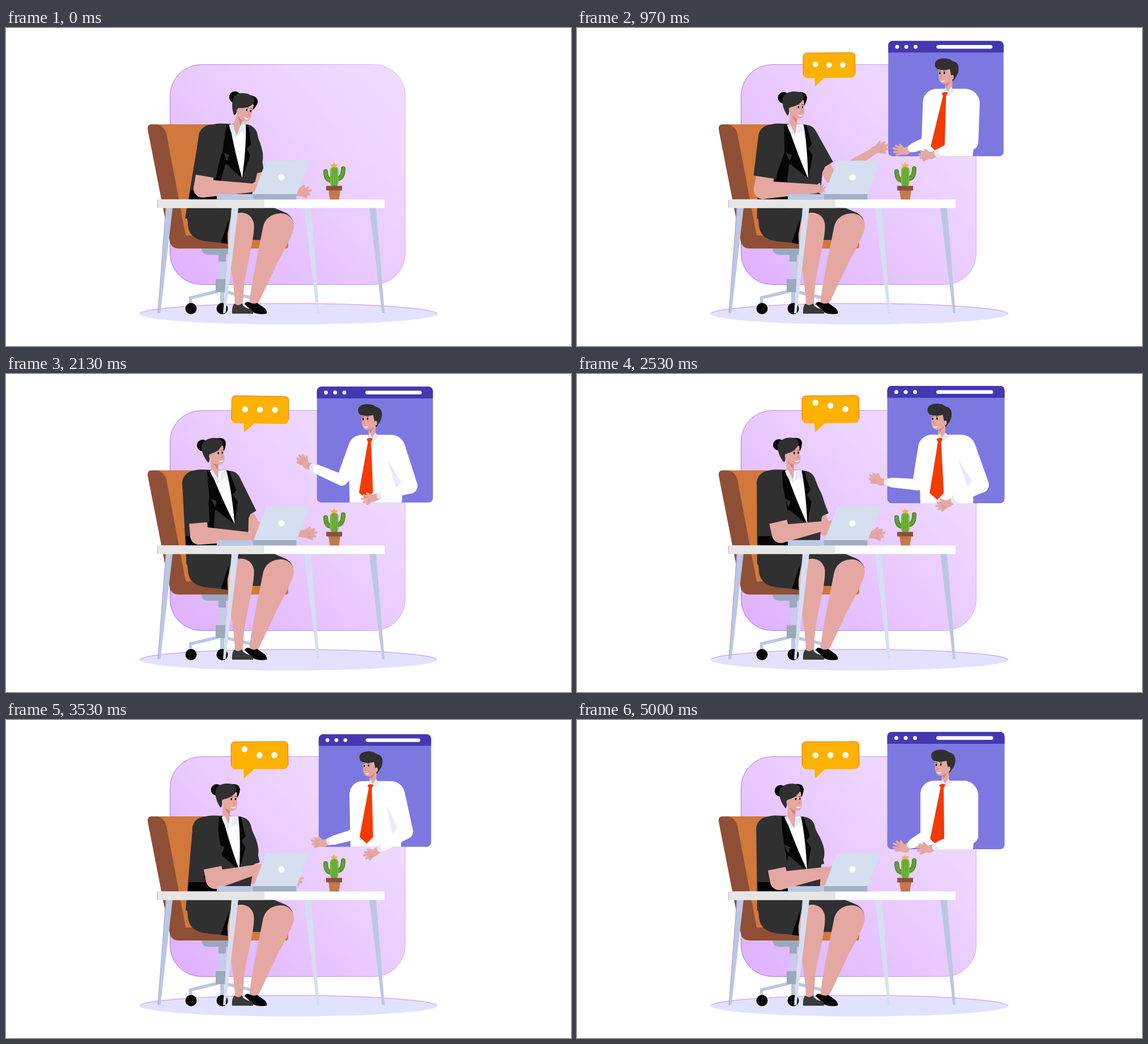
Recreate the animation shown at these times as an HTML page with a canvas. Size 997x561 px, loop 5.11 s.

```html
<!DOCTYPE html>
<html lang="en">
<head>
<meta charset="utf-8">
<title>Video meeting</title>
<style>
html, body { margin: 0; width: 100%; height: 100%; overflow: hidden; background: #fff; }
canvas { display: block; }
</style>
</head>
<body>
<canvas id="stage" width="997" height="561"></canvas>
<script>
const ctx = document.getElementById('stage').getContext('2d');
const LOOP = 5110;
const SKIN = '#e5a7a2', SEAM = '#c9857f', DARK = '#303030', BLACK = '#050505';
const WHITE = '#fff', PALE = '#e6eaf6', STEEL = '#bbc7e2', MIST = '#d5dfef';

// Pose tracks: one value per key time
const KEYS = [100, 570, 1430, 2130, 2930, 4170, 5000];
const woman = {
  lean: [.18, .10, -.026, -.04, .065, .11, 0],
  bunX: [404, 380, 353, 347, 367, 374, 359],
  bunY: [122, 122, 125, 126, 124, 123, 125],
  tilt: [19, 9, .5, -2, 2, 5, 0],
  elbowX: [347, 332, 326, 341, 373, 362, 357],
  elbowY: [283, 284, 287, 285, 280, 284, 284],
  handX: [431, 424, 418, 428, 452, 446, 452],
  handY: [282, 281, 287, 287, 247, 278, 266],
  farElbowX: [444, 449, 449, 438, 438, 438, 427],
  farElbowY: [280, 268, 262, 270, 277, 280, 282],
  farHandX: [516, 523, 530, 526, 513, 492, 488],
  farHandY: [290, 223, 211, 282, 284, 280, 275],
  farTurn: [0, -16, -8, 2, -2, 0, 0]
};
const man = {
  shift: [10, 9, -1, -3, -6, 2.5, 0],
  elbowX: [620, 620, 615, 592, 612, 617, 616],
  elbowY: [203, 203, 200, 188, 203, 205, 204],
  handX: [584, 584, 559, 528, 544, 565, 577],
  handY: [223, 223, 208, 160, 220, 223, 227],
  turn: [183, 183, 196, 225, 185, 190, 198],
  farElbowX: [696, 696, 694, 713, 712, 700, 694],
  farElbowY: [203, 203, 202, 198, 194, 206, 204],
  farHandX: [622, 622, 627, 648, 657, 637, 620],
  farHandY: [227, 227, 225, 220, 238, 239, 228],
  farTurn: [180, 180, 170, 168, 152, 165, 182]
};

const clamp = (v, a, b) => Math.min(b, Math.max(a, v));

// Smooth curve through the keys without overshoot
function sample(track, t) {
  const slope = i => (track[i + 1] - track[i]) / (KEYS[i + 1] - KEYS[i]);
  const tangent = i => {
    if (i === 0) return slope(0);
    if (i === KEYS.length - 1) return slope(i - 1);
    const a = slope(i - 1), b = slope(i);
    return a * b <= 0 ? 0 : 2 * a * b / (a + b);
  };
  t = clamp(t, KEYS[0], KEYS[KEYS.length - 1]);
  let i = 0;
  while (i < KEYS.length - 2 && t > KEYS[i + 1]) i++;
  const h = KEYS[i + 1] - KEYS[i], u = (t - KEYS[i]) / h, v = 1 - u;
  return track[i] * v * v * (1 + 2 * u) + track[i + 1] * u * u * (3 - 2 * u)
    + h * u * v * (tangent(i) * v - tangent(i + 1) * u);
}

function poseAt(tracks, t) {
  const pose = {};
  for (const name in tracks) pose[name] = sample(tracks[name], t);
  return pose;
}

function shape(d, fill) { ctx.fillStyle = fill; ctx.fill(new Path2D(d)); }

function line(d, color, width = 1) {
  ctx.strokeStyle = color;
  ctx.lineWidth = width;
  ctx.stroke(new Path2D(d));
}

function oval(x, y, rx, ry, fill) {
  ctx.beginPath();
  ctx.ellipse(x, y, rx, ry, 0, 0, 7);
  ctx.fillStyle = fill;
  ctx.fill();
}

function dot(x, y, r, fill) { oval(x, y, r, r, fill); }

function box(x, y, w, h, r, fill) {
  ctx.beginPath();
  ctx.roundRect(x, y, w, h, r);
  ctx.fillStyle = fill;
  ctx.fill();
}

function group(draw) { ctx.save(); draw(); ctx.restore(); }

const mix = (a, b, u) => [a[0] + (b[0] - a[0]) * u, a[1] + (b[1] - a[1]) * u];

// Tapered capsule
function limb(a, b, ra, rb, fill) {
  const dx = b[0] - a[0], dy = b[1] - a[1];
  const dir = Math.atan2(dy, dx);
  const off = Math.acos(clamp((ra - rb) / Math.hypot(dx, dy), -1, 1));
  ctx.beginPath();
  ctx.arc(...a, ra, dir + off, dir - off + 2 * Math.PI);
  ctx.arc(...b, rb, dir - off, dir + off);
  ctx.fillStyle = fill;
  ctx.fill();
}

// Round shoulder, flat cuff
function sleeve(a, b, r, half, fill) {
  const dir = Math.atan2(b[1] - a[1], b[0] - a[0]);
  const nx = -Math.sin(dir) * half, ny = Math.cos(dir) * half;
  ctx.beginPath();
  ctx.arc(...a, r, dir + Math.PI / 2, dir + Math.PI * 1.5);
  ctx.lineTo(b[0] - nx, b[1] - ny);
  ctx.lineTo(b[0] + nx, b[1] + ny);
  ctx.fillStyle = fill;
  ctx.fill();
}

function hand(x, y, deg, flip = 1, size = 1) {
  group(() => {
    ctx.translate(x, y);
    ctx.rotate(deg * Math.PI / 180);
    ctx.scale(size, size * flip);
    ctx.lineCap = 'round';
    oval(0, 0, 10, 6.5, SKIN);
    line('M1 -4L9 -10.500M4 -4L16 -8M5 -1L20 -3M5 2L18 3.500M3 4L13 8', SKIN, 4);
    line('M9 -3L16 -5.500M8 .5L18 .3M7 4L15 5.700', SEAM, .6);
  });
}

function drawRoom() {
  const g = ctx.createLinearGradient(300, 440, 690, 80);
  g.addColorStop(0, '#dfb2ff');
  g.addColorStop(.75, '#eed6ff');
  g.addColorStop(1, '#f0dbff');
  box(289.5, 64.5, 415, 388, 55, g);
  const edge = ctx.createLinearGradient(289, 300, 705, 200);
  edge.addColorStop(0, '#a274de');
  edge.addColorStop(1, '#dcb6f6');
  ctx.strokeStyle = edge;
  ctx.lineWidth = 1;
  ctx.stroke();

  oval(498.5, 504.5, 262, 18.5, '#e2e2ff');
  line('M236.5 504.5A262 18.5 0 0 1 760.5 504.5', '#d9a9ee', 1.5);

  shape('M250 179Q249 170 257 170H345L400 373H498V385Q498 389 493 389H305Q292 389 289 377L278 322Z', '#8f4f36');
  shape('M267 170H370L430 366H317L283 186Q280 174 267 170Z', '#d1783c');
  shape('M392 366H498V385Q498 389 493 389H392Z', '#d1783c');
  shape('M345 389H392V400H356Q346 400 345 389Z', '#9aa9bd');
  line('M325.500 486V476L374 464.500M433 486V476L384 464.500', STEEL, 5.5);
  box(377, 412, 10, 34, 0, '#c3cfe6');
  box(375, 400, 13, 12, 0, '#9aa9bd');
  box(370, 443, 17, 23, 0, '#9aa9bd');
  box(378, 466, 7, 20, 0, STEEL);
  dot(326.5, 495, 10, BLACK);
  dot(381.5, 495, 10, BLACK);
}

function drawLegs() {
  shape('M319 316L318 333Q321 338 321 348C323 368 338 375 358 377L392 380V373L452 374Q460 332 480 328Q502 328 507 347Q508 335 494 326L470 316Z', DARK);
  shape('M379 379L393 338V381Z', BLACK);
  shape('M396 338C400 321 434 320 437.500 346C439 372 424 420 420 455L417.500 489H404C403 440 390 400 391 362Z', SKIN);
  shape('M453 354C456 335 470 327 486 327C500 328 508 338 508 349C507 364 492 390 478 416L448 480L443 488H429C433 450 444 400 453 354Z', SKIN);
  shape('M421 487Q424 481 430 484Q437 488 443 485L456 494Q461 498 460 504Q446 506 437 502Z', BLACK);
  shape('M399 504Q398 491 403 486Q410 492 416 486Q420 494 432 496Q437 499 436 504Z', '#3a3a3a');
}

function drawDesk() {
  shape('M282 317H294L272.500 503H268Z', STEEL);
  shape('M398 317H410L387.500 503H383Z', MIST);
  shape('M526 317H538L553 503H548.500Z', MIST);
  shape('M641 317H653L668 503H663.500Z', STEEL);
  line('M282 318L268 503', '#a68ad8', .8);
  box(267, 302.5, 401, 15, 0, WHITE);
  box(267, 302.5, 189, 15, 0, '#e6e6e6');
  line('M267.500 303V317', '#d49be8');

  box(372, 293, 65, 9.5, 0, '#b9c8e4');
  box(436, 293, 76.5, 9.5, 0, '#a3b0c4');
  shape('M463 234H533Q536 234 535 237L513 293H437L458 237Q459 234 463 234Z', MIST);
  dot(486, 263.5, 5.6, WHITE);

  group(() => {
    ctx.lineCap = 'round';
    line('M575 269Q564 269 564 253M584 266Q595 266 595 248', '#4c8527', 8);
    line('M575 269Q564 269 564 253M584 266Q595 266 595 248', '#62a033', 5);
    box(572, 244, 14.5, 36, 7, '#74b83a');
    line('M576 248V278M579.200 246V278M582.500 248V278', '#4f9130', .9);
    shape('M579 237L581 241L586 240L583 244L584 247L579 245L574 247L575 244L572 240L577 241Z', '#eeb04c');
  });
  shape('M569 286H590L587.500 302.500H571.500Z', '#c4794a');
  box(565, 278.5, 28, 8, 0, '#8b4f3c');
}

function drawWomanHead(p) {
  group(() => {
    ctx.translate(p.bunX, p.bunY);
    ctx.rotate(p.tilt * Math.PI / 180);
    ctx.translate(-359, -125);
    shape('M372 146L386 158L385 178L383 192L372 172Z', SKIN);
    shape('M374 154L385 160L384 168Z', SEAM);
    dot(359, 125, 10.2, BLACK);
    shape('M384 113Q398 111 400 121Q400 130 395 138L385 132Z', BLACK);
    shape('M372 139L370 148L375 155Q382 161 390 160Q396 158 397 149L395 127L384 124Z', SKIN);
    shape('M357 127C358 116 374 109 389 114Q397 119 392 128Q386 137 374 140L371 142L370 153L368 156C361 147 357 138 357 127Z', DARK);
    oval(372, 145, 2.4, 4, SKIN);
    oval(386, 139.5, 1.3, 2.1, BLACK);
    oval(393.2, 139, 1.2, 2.1, BLACK);
    line('M383 135Q386 133 388 135M391.500 134.500L395 134.500', DARK, .9);
    line('M391 143L393.500 147.500L390.500 148', SEAM, .8);
    shape('M385.500 153Q391 154 395 152Q392 159 385.500 153Z', WHITE);
  });
}

function drawWoman(t) {
  const p = poseAt(woman, t);
  const leaned = (x, y) => [x + p.lean * (325 - y), y];
  const body = draw => group(() => {
    ctx.transform(1, 0, -p.lean, 1, p.lean * 325, 0);
    draw();
  });
  const shoulder = leaned(338.5, 193), elbow = [p.elbowX, p.elbowY];
  const farShoulder = leaned(400, 191), farElbow = [p.farElbowX, p.farElbowY];
  const farHand = [p.farHandX, p.farHandY];
  const wrist = [p.handX, p.handY];

  limb(farShoulder, farElbow, 12, 11, SKIN);
  limb(farElbow, farHand, 11, 6, SKIN);
  hand(...farHand, p.farTurn, 1, 1.08);
  drawLegs();

  body(() => {
    shape('M318 336L316.500 205C316 183 326 169 350 168.500L396 170C409 171 415 181 422 195C436 219 442 236 431 254L428 303L380 338Z', DARK);
    shape('M319 286H372V318H319Z', BLACK);
    shape('M364 216L374 238L370 278H344Z', BLACK);
  });
  sleeve(farShoulder, mix(farShoulder, farElbow, .74), 20, 17, DARK);
  body(() => {
    shape('M361 171H370L406 266L372 238L376 224L363 219Z', BLACK);
    shape('M392 170L400 171L411 205L405 213L413 225L406 266L398 200Z', BLACK);
    shape('M372 240L404 264L424 271H369Z', DARK);
    shape('M367 170H395Q403 205 406 265Q387 225 367 170Z', WHITE);
  });
  drawWomanHead(p);
  body(() => {
    shape('M366 171L371 169L383 191L376 189Q370 183 366 171Z', PALE);
    shape('M386 172L394 171L397 190L391 182L383 191Z', PALE);
  });

  const cuff = mix(shoulder, elbow, .76);
  limb(cuff, elbow, 16, 16, SKIN);
  limb(elbow, wrist, 16, 8, SKIN);
  hand(...wrist, 2, 1, .85);
  sleeve(shoulder, cuff, 22.5, 20, DARK);
}

function drawManHead() {
  shape('M645 90L657 86L656 106L649 114L643 108Z', SKIN);
  shape('M645 97L654 93L646 104Z', SEAM);
  shape('M631 70L632 88Q634 99 642 98Q651 97 657 89V70Z', SKIN);
  shape('M625 63C625 53 640 50 652 54Q656 57 659 58C669 60 670 74 664 84L657 94L654 82L652 72Q640 75 630 72Q625 69 625 63Z', DARK);
  oval(656.5, 86, 2.4, 4, SKIN);
  oval(634, 79, 1.3, 2.3, BLACK);
  oval(642, 78.5, 1.3, 2.3, BLACK);
  line('M631.500 75L635.500 74.500M639.500 74.500L644 74.500', DARK, .9);
  line('M637 82L635 87L638 87.500', SEAM, .8);
  shape('M634.500 92Q639 94 643.500 91.500Q640 97.500 634.500 92Z', WHITE);
}

function manArm(shoulder, elbow, palm, deg, shoulderR, elbowR) {
  const wrist = mix(palm, elbow, 14 / Math.hypot(elbow[0] - palm[0], elbow[1] - palm[1]));
  const cuff = mix(wrist, elbow, .16);
  limb(palm, wrist, 6, 6, SKIN);
  hand(...palm, deg, -1);
  limb(wrist, cuff, 7, 8, PALE);
  limb(shoulder, elbow, shoulderR, elbowR, WHITE);
  limb(elbow, cuff, elbowR, 8.5, WHITE);
}

function drawMan(t) {
  const p = poseAt(man, t), k = p.shift / 115;
  const leaned = (x, y) => [x + k * (228 - y), y];
  const body = draw => group(() => {
    ctx.transform(1, 0, -k, 1, k * 228, 0);
    draw();
  });
  const farElbow = [p.farElbowX, p.farElbowY];

  body(() => shape('M606 228V132C607 114 620 107 640 107H672C696 107 706 116 706 136L699 228Z', WHITE));
  manArm(leaned(630, 131), [p.elbowX, p.elbowY], [p.handX, p.handY], p.turn, 24, 10);
  group(() => {
    ctx.translate(p.shift * 1.35, 0);
    drawManHead();
  });
  body(() => {
    shape('M641 109L646 105L650 114L643 117Z', PALE);
    shape('M655 103L661 111L652 119L649 113Z', PALE);
    shape('M642 117H647L648 210L636 222L623 210Z', '#f43a05');
    shape('M639 115Q644 111 650 114L648 119Q645 121 641 119Z', '#f43a05');
  });
  manArm(leaned(682, 133), farElbow, [p.farHandX, p.farHandY], p.farTurn, 26, 14);
  if (p.farElbowX > 704) {
    const [x, y] = farElbow;
    shape(`M672 150L${x - 15} ${y - 7}L${x - 24} ${y + 4}Z`, '#e8ebf8');
  }
}

function windowScale(t) {
  if (t < 665) return Math.max(0, (t - 100) / 565);
  const wave = (a, b, from, to) => from + (to - from) * (1 - Math.cos(Math.PI * (t - a) / (b - a))) / 2;
  if (t < 1400) return wave(665, 1400, 1, .955);
  if (t < 2500) return wave(1400, 2500, .955, 1);
  if (t < 3750) return wave(2500, 3750, 1, .955);
  return wave(3750, 5000, .955, 1);
}

function drawWindow(t) {
  const s = windowScale(t);
  if (s <= 0) return;
  group(() => {
    ctx.translate(651, 124.5);
    ctx.scale(s, s);
    ctx.translate(-651, -124.5);
    box(547.5, 21, 207, 207, 8, '#7d78e0');
    box(547.5, 21, 207, 21, [8, 8, 0, 0], '#4338b0');
    for (let i = 0; i < 3; i++) dot(563.5 + i * 16.5, 31.7, 3.5, WHITE);
    box(634, 28.4, 100.5, 6.6, 3.3, WHITE);
    drawMan(t);
  });
}

function drawBubble(t) {
  const s = clamp((t - 665) / 335, 0, 1);
  if (!s) return;
  group(() => {
    ctx.translate(420, 102);
    ctx.rotate(1.6 * Math.cos(2 * Math.PI * (t - 1760) / 2500) * Math.PI / 180);
    ctx.scale(s, s);
    ctx.translate(-420, -102);
    shape('M419 85H440L420 103Z', '#fdb100');
    box(397.3, 38.5, 100.7, 48.5, 8, '#fdb100');
    line('M397.500 80V46Q398 38.500 405 38.500H490Q498 38.500 498 46V80', '#f2651c');
    for (let i = 0; i < 3; i++) {
      const start = 950 + i * 290, turn = Math.floor((t - start) / 1200);
      const u = (t - start - turn * 1200) / 600;
      const active = turn >= 0 && start + turn * 1200 < 4500 && u < 1;
      dot(421.2 + i * 26.4, 62.3 - (active ? 13 * Math.sin(Math.PI * u) : 0), 5.3, WHITE);
    }
  });
}

function render(now) {
  const t = clamp(now % LOOP, 100, 5000);
  ctx.clearRect(0, 0, 997, 561);
  drawRoom();
  drawBubble(t);
  drawWindow(t);
  drawWoman(t);
  drawDesk();
}

const begin = performance.now();
function tick() {
  render(performance.now() - begin);
  requestAnimationFrame(tick);
}
tick();
</script>
</body>
</html>
```
